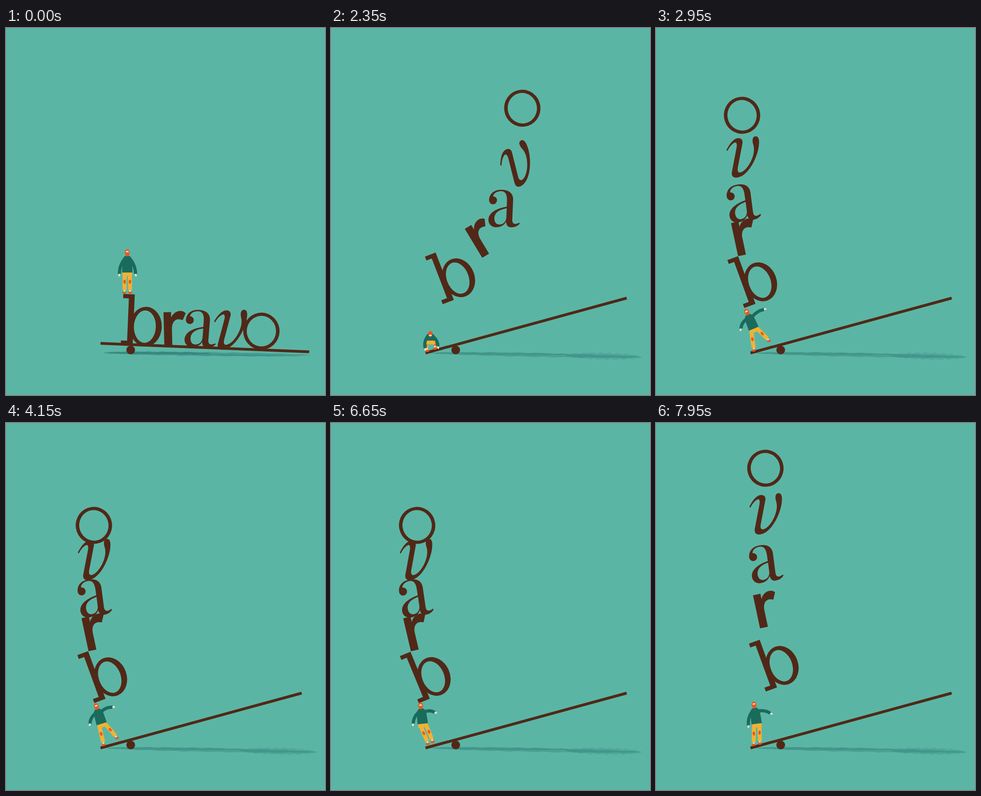
An HTML page for the animation above (8 s loop, 697 by 803 pixels).

```html
<!DOCTYPE html>
<html lang="en">
<head>
<meta charset="utf-8">
<title>Seesaw</title>
<style>
  html, body { margin: 0; width: 100%; height: 100%; overflow: hidden; background: #5bb5a5; }
  svg { display: block; width: 100%; height: 100%; }
</style>
</head>
<body>
<svg viewBox="0 0 697 803" role="img" aria-label="A man on a seesaw tosses and balances the letters of bravo">
  <g id="shadow" fill="#0e4f50"></g>
  <g fill="#512817">
    <circle cx="272.5" cy="704.5" r="9.5"/>
    <path id="board" stroke="#512817" stroke-width="6"/>
    <g class="letter"><g transform="translate(-10 -56)">
      <path d="M-25 0H0V111H-26V102H-12.5V9H-25Z"/>
      <path fill-rule="evenodd" d="M-8 69.5a35 43.5 0 1 1 70 0a35 43.5 0 1 1 -70 0ZM1 69.5a24 35.5 0 1 0 48 0a24 35.5 0 1 0 -48 0Z"/>
    </g></g>
    <g class="letter"><path transform="translate(-20 -36)" d="M0 0H16.5V12C21 2 30 -2.5 38 -2Q44 -1.5 48.5 3.5L41.5 18.5C28 12 17.5 19 17.5 38V74H0Z"/></g>
    <g class="letter">
      <circle cx="-24" cy="-18" r="8.7"/>
      <path fill-rule="evenodd" d="M-32.5 -20C-31 -34 -20 -41 -6 -41C10 -41 20 -34 20 -20L18 25C18 34 24 36 33 31L34.5 33C28 40 22 41 15 41C9 41 5 37 4.5 29C0 37 -8 41 -17 41C-27 41 -34 34 -34 25C-34 10 -18 0 6 -4L6.5 -18C7 -32 2 -38 -6 -38C-15 -38 -23 -34 -24 -26ZM6 -.5C-10 2 -21 9 -21 22C-21 31 -16 35 -10 35C-2 35 4 29 5 21Z"/>
    </g>
    <g class="letter"><path d="M-35 -15C-28 -29 -19 -41 -9 -41C-2 -41 1 -36 0 -30L-10 22C-12 32 -9 35 -4 34C10 30 26 2 25 -18C25 -26 22 -28 22 -36C22 -42 25 -45 29 -45C35 -45 37 -38 36 -28C35 -4 15 40 -10 45C-20 47 -25 42 -23 32L-13 -20C-11 -30 -14 -33 -18 -31C-25 -27 -30 -19 -33 -13Z"/></g>
    <g class="letter"><path fill-rule="evenodd" d="M-39.7 0a39.7 40.5 0 1 1 79.4 0a39.7 40.5 0 1 1 -79.4 0ZM-32 0a32 33.5 0 1 0 64 0a32 33.5 0 1 0 -64 0Z"/></g>
  </g>
  <g id="man"></g>
</svg>
<script>
const LOOP = 8000;
const SKIN = '#f8e3c4', ORANGE = '#e9571f', GREEN = '#1a6b5b', YELLOW = '#f2b232';

const clamp = v => Math.min(1, Math.max(0, v));
const ramp = (t, from, to) => clamp((t - from) / (to - from));
const mix = (a, b, k) => Array.isArray(a) ? a.map((v, i) => mix(v, b[i], k)) : a + (b - a) * k;
const add = (a, b, k = 1) => [a[0] + b[0] * k, a[1] + b[1] * k];
const rad = a => a * Math.PI / 180;
const $ = id => document.getElementById(id);

// Movement is stepped: from each time on, the picture holds for the given span
const HOLDS = [[0, 1000], [1000, 200], [1800, 100], [2050, 200], [2250, 100], [2950, 200], [3150, 300],
  [3750, 200], [4950, 500], [5950, 700], [6650, 200], [7050, 300], [7650, 200], [7850, 100]];
function stepped(t) {
  const [from, span] = HOLDS.findLast(h => h[0] <= t);
  return from + Math.floor((t - from) / span) * span;
}

// ---- Board and shadow
const boardAt = t => mix([206.5, 690, 662.5, 708.5], [206.5, 711, 646, 591], ramp(t, 1950, 2050));

// A brush stroke with tapered ends and a slightly rough edge
function smear(x0, x1, y0, y1, h, alpha) {
  const edge = side => Array.from({ length: 25 }, (_, i) => {
    const u = i / 24, rough = 1 + .25 * Math.sin(i * 2.4 + side + h);
    return n(mix(x0, x1, u)) + ' ' + n(mix(y0, y1, u) + side * h * Math.sqrt(Math.sin(Math.PI * u)) * rough);
  });
  return `<path fill-opacity="${alpha}" d="M${edge(-1).concat(edge(1).reverse()).join('L')}Z"/>`;
}

function drawShadow(t) {
  if (t < 1400) return smear(210, 668, 711, 716, 4, .25) + smear(212, 450, 710, 712, 3, .28) + smear(380, 640, 714, 718, 2, .12);
  if (t < 2000) return smear(213, 668, 709, 712, 2.5, .22) + smear(232, 450, 711, 713, 3, .16);
  return smear(212, 680, 711, 720, 4, .2) + smear(216, 520, 711, 714, 3, .15) + smear(510, 680, 716, 720, 7, .13);
}

// ---- Letters: every pose is centre x, centre y, angle
const LETTERS = [
  { x: 289, half: 54, sit: 2.4, flung: 540, spin: -21, stack: 548.5, lean: -20 },
  { x: 365, half: 39, sit: -1.5, flung: 460, spin: -31, stack: 458, lean: -12 },
  { x: 425, half: 41, sit: 2, flung: 395, spin: 0, stack: 382, lean: -10 },
  { x: 488.5, half: 42, sit: 4, flung: 299, spin: -25, stack: 298.5, lean: 0 },
  { x: 558, half: 41, sit: 2, flung: 175.5, spin: -8, stack: 224, lean: -8 }
];

// Dying wobble of the pile, straightened before the next toss
const sway = t => t < 3150 ? -.5 :
  .95 * (1 - Math.exp(-Math.abs(t - 4150) / 1400) * Math.cos(rad((t - 4150) * .9))) * ramp(t, 7650, 7050);

const rest = l => [l.x, 690 + .0406 * (l.x - 206.5) - l.half, l.sit];

function pile(l, i, k) {
  const bow = 8 * Math.sin(Math.PI * (i + 1) / 6);
  return [(i ? 192 : 208) - bow * k, l.stack, l.lean - 2.5 * k / (i + 1)];
}

function flight(l, i, t) {
  const k = (t - 2350) / 600;
  const from = [418 - 10 * (4 - i) ** 2, l.flung, l.spin];
  const to = add(pile(l, i, 0), [-i, -16.5 * Math.max(0, i - 2)]).concat(l.lean);
  const lift = 127 * Math.sin(Math.PI * (i + .5) / 9);
  const [x, y, a] = mix(from, to, k);
  return [x, y - lift * 4 * k * (1 - k), a];
}

function letterAt(l, i, t) {
  if (t < 2250) return mix(rest(l), flight(l, i, 2250), ramp(t, 1974, 2189));
  if (t < 3150) return flight(l, i, t);
  const [x, y, a] = pile(l, i, sway(t)), toss = ramp(t, 7750, 7950);
  return [x + 47 * toss, y - 25 * (i + 1) * toss, a];
}

// ---- Man: waist, torso lean, torso length, hands, feet, shoe angle (limbs relative to the waist)
const upright = (x, y, toe = 0, dip = 0) =>
  [[x, y + dip], 0, 34.5, [[-17.5, 5.5], [18.5, 5.5]], [[-6, 43 - dip], [6, 43 - dip]], toe];
const CROUCH = [[217, 684], 0, 14, [[-11, 19], [17, 15]], [[-6, 21], [10, 16]], -12];
const STAND = [[220, 658], -8, 33, [[-18, 6], [32, -22]], [[-6.5, 45], [7, 42]], -10];

// The left foot stays put while the right one swings in
function balance(k) {
  k = Math.min(k, 1);
  return [[209 - 9 * k, 658], -17 + 11 * k, 31.5, [[-26 + 5 * k, 2], [26 + 2.5 * k, -36.5 + 13 * k]],
    [[4.5 + 7.5 * k, 45 - 2 * k], [33 - 12 * Math.max(0, k), 30 + 9 * k]], -15];
}

function jump(t) {
  if (t < 1400) return upright(265, 535, 0, t === 1000 ? 5 : 0);
  return upright(265 - 43 * ramp(t, 1200, 1600) ** 2, 511 + 41 * ((t - 1530) / 270) ** 2, 80);
}

function manAt(t) {
  const pose = mix(jump(Math.min(t, 2000)), CROUCH, ramp(t, 1930, 2030));
  const up = mix(pose, STAND, ramp(t, 2350, 2650));
  return mix(mix(up, balance(sway(t)), ramp(t, 2650, 2950)), STAND, ramp(t, 7750, 7950));
}

const n = v => v.toFixed(1);
const xy = p => n(p[0]) + ' ' + n(p[1]);
const line = (d, color, w) => `<path d="${d}" fill="none" stroke="${color}" stroke-width="${w}"/>`;
const oval = (p, rx, ry, a, color) =>
  `<ellipse rx="${rx}" ry="${ry}" fill="${color}" transform="translate(${xy(p)}) rotate(${n(a)})"/>`;
const angle = (a, b) => Math.atan2(b[1] - a[1], b[0] - a[0]) * 180 / Math.PI;
const toward = (a, b, gap) => mix(b, a, gap / Math.hypot(b[0] - a[0], b[1] - a[1]));

// Middle of a limb, pushed outward
function joint(a, b, side, bow) {
  const d = rad(angle(a, b));
  return add(mix(a, b, .47), [Math.sin(d) * side, -Math.cos(d) * side], bow);
}

// Curve from a to c that passes through b
const bend = (a, b, c) => `M${xy(a)}Q${xy(add(add(b, b), mix(a, c, .5), -1))} ${xy(c)}`;

function drawMan([waist, lean, len, hands, feet, toe]) {
  const s = Math.sin(rad(lean)), c = Math.cos(rad(lean));
  const at = (a, b) => add(waist, [c * a - s * (b - len), s * a + c * (b - len)]);
  const squash = clamp((34 - len) / 20);

  const leg = (rel, i) => {
    const side = i * 2 - 1, hip = at(side * 5.7, len), foot = add(waist, rel);
    const knee = joint(hip, foot, side, 3 * squash), hem = toward(knee, foot, 4.5);
    return line(`M${xy(hem)}L${xy(foot)}`, SKIN, 3.6)
      + oval(add(foot, [side * .4, 1.3]), 4.3, 2.5, toe, ORANGE)
      + line(bend(hip, knee, hem), YELLOW, 8.7)
      + oval(knee, 2.6, 4.4, angle(hip, foot) - 90 + side * 5, ORANGE);
  };
  const arm = (rel, i) => {
    const side = i * 2 - 1, shoulder = at(side * 7, 6), hand = add(waist, rel);
    const elbow = joint(shoulder, hand, side, 3);
    return oval(hand, 3.2, 2, angle(elbow, hand), SKIN)
      + line(bend(shoulder, elbow, toward(elbow, hand, 2.5)), GREEN, 7);
  };
  const torso = `M${xy(at(-4, -2))}Q${xy(at(-10, 1))} ${xy(at(-10.5, 9))}L${xy(at(-11.5, len))} `
    + `${xy(at(11.5, len))} ${xy(at(10.5, 9))}Q${xy(at(10, 1))} ${xy(at(4, -2))}Z`;
  const face = -2 + 6 * squash;

  return feet.map(leg).join('')
    + line(`M${xy(at(0, len - 2))}L${xy(at(0, len + 8))}`, YELLOW, 21)
    + hands.map(arm).join('')
    + `<path d="${torso}" fill="${GREEN}"/>`
    + `<g transform="translate(${xy(at(0, -9 + 8 * squash))}) rotate(${n(lean * 1.2)})">`
    + oval([0, 0], 5.2, 7.8 - 1.8 * squash, 0, ORANGE)
    + oval([0, face], 3, 2, 0, SKIN)
    + oval([0, face + 1.8], 2.2, .9, 0, ORANGE) + '</g>';
}

// ---- Playback
const glyphs = document.querySelectorAll('.letter');
let shown = -1;
function render(time) {
  const t = stepped(time);
  if (t === shown) return;
  shown = t;
  LETTERS.forEach((l, i) => {
    const [x, y, a] = letterAt(l, i, t);
    glyphs[i].setAttribute('transform', `translate(${n(x)} ${n(y)}) rotate(${n(a)})`);
  });
  const b = boardAt(t);
  $('board').setAttribute('d', `M${xy(b)}L${xy(b.slice(2))}`);
  $('shadow').innerHTML = drawShadow(t);
  $('man').innerHTML = drawMan(manAt(t));
}

const start = performance.now();
function tick() {
  render((performance.now() - start) % LOOP);
  requestAnimationFrame(tick);
}
tick();
</script>
</body>
</html>
```
